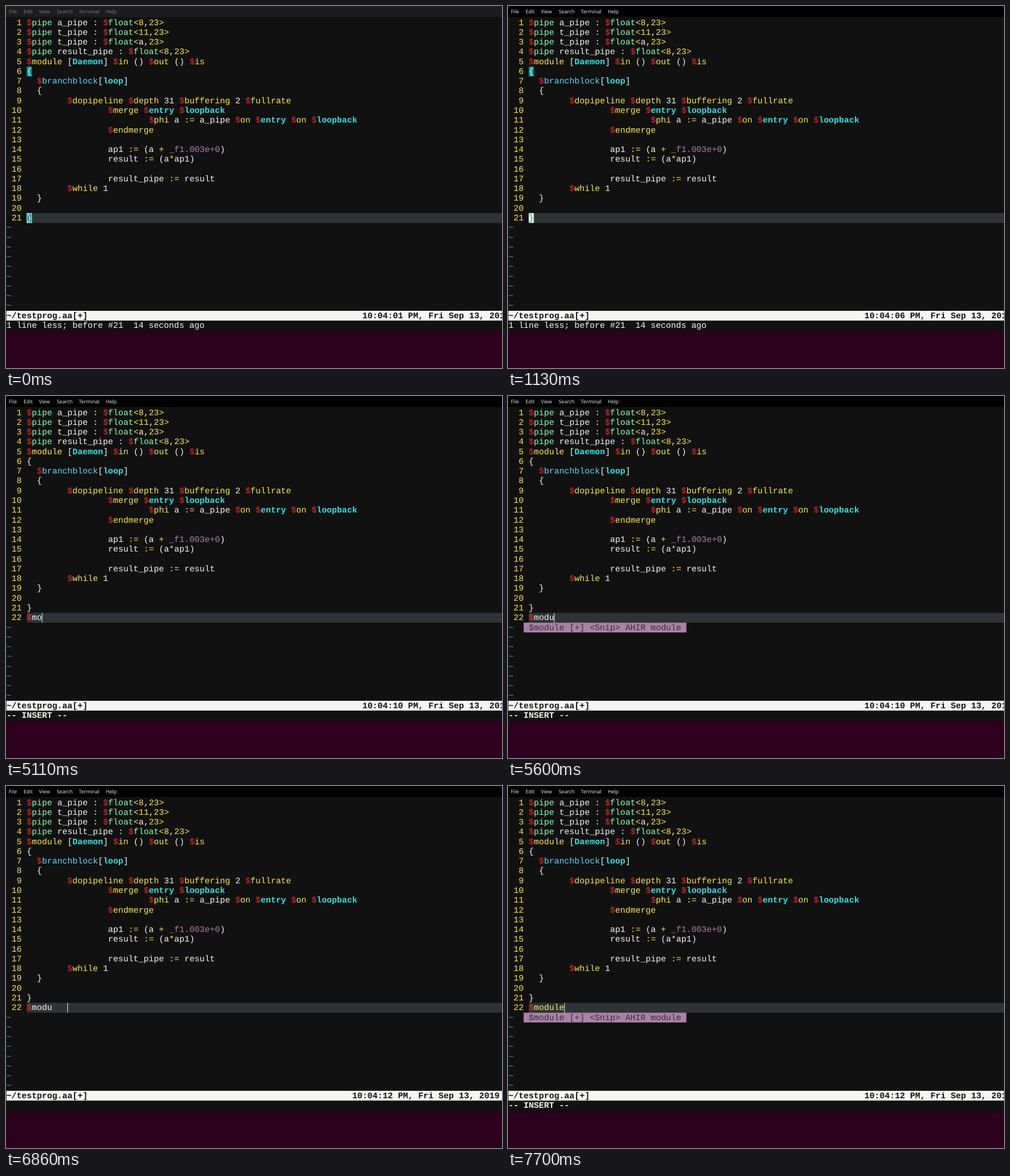
Animation of 875 by 640 pixels, one loop 8 s. Source, as an HTML page with a canvas:

```html
<!DOCTYPE html>
<html lang="en">
<head>
<meta charset="utf-8">
<title>Editor session</title>
<style>
  html, body { margin: 0; width: 100%; height: 100%; overflow: hidden; background: #2c001e; }
  canvas { display: block; }
</style>
</head>
<body>
<canvas id="stage" width="875" height="640"></canvas>
<script>
const ctx = document.getElementById('stage').getContext('2d');
ctx.textRendering = 'geometricPrecision';
const LOOP = 8000, CELL_W = 8.971, CELL_H = 17.27, LEFT = 0.7, TOP = 20.8, BASELINE = 12.8;
const WHITE = '#f5f5f3', YELLOW = '#fce94f', RED = '#ef2929', CYAN = '#34e2e2', GREEN = '#87ffaf',
  BLUE = '#5fd7ff', PURPLE = '#ad7fa8', TEAL = '#06989a', TILDE = '#4aa3c7', BACK = '#111111', BAND = '#2e3436';

const source = `$pipe a_pipe : $float<8,23>
$pipe t_pipe : $float<11,23>
$pipe t_pipe : $float<a,23>
$pipe result_pipe : $float<8,23>
$module [Daemon] $in () $out () $is
{
  $branchblock[loop]
  {
        $dopipeline $depth 31 $buffering 2 $fullrate
                $merge $entry $loopback
                        $phi a := a_pipe $on $entry $on $loopback
                $endmerge

                ap1 := (a + _f1.003e+0)
                result := (a*ap1)

                result_pipe := result
        $while 1
  }

}`.split('\n');

const keywords = {};
const setColor = (words, color) => words.split(' ').forEach(w => keywords[w] = color);
setColor('pipe float', GREEN);
setColor('entry loopback', CYAN);
setColor('branchblock', BLUE);
setColor('module in out is dopipeline depth buffering fullrate merge phi on endmerge while', YELLOW);

// Each step overrides part of the state from its time on.
const steps = [
  [0, { sec: 1, focus: false, insert: false, line: '', popup: false, redraw: false, wide: false }],
  [400, { focus: true }],
  [480, { sec: 5 }],
  [1130, { sec: 6 }],
  [3330, { sec: 8, insert: true }],
  [3910, { sec: 9 }],
  [4700, { line: '$' }],
  [4900, { sec: 10 }],
  [5000, { line: '$m' }],
  [5110, { line: '$mo' }],
  [5160, { popup: true }],
  [5380, { line: '$mod' }],
  [5430, { wide: true }],
  [5550, { wide: false }],
  [5600, { line: '$modu' }],
  [6200, { sec: 11, popup: false, wide: true, redraw: true }],
  [6250, { line: '$modu   ', wide: false, redraw: false }],
  [6860, { sec: 12, wide: true, redraw: true }],
  [6910, { line: '$modu', redraw: false }],
  [6960, { wide: false }],
  [7370, { popup: true }],
  [7620, { line: '$modul', popup: false }],
  [7700, { line: '$module', popup: true }]
];

const colX = col => LEFT + col * CELL_W;
const rowY = row => TOP + row * CELL_H;

function fill(color, x, y, w, h) {
  ctx.fillStyle = color;
  ctx.fillRect(x, y, w, h);
}

const fillCells = (color, col, row, count) =>
  fill(color, colX(col), rowY(row), count * CELL_W, CELL_H);

function print(text, col, row, color = WHITE, bold = false) {
  ctx.font = `${bold ? 'bold ' : ''}14.95px "Liberation Mono", monospace`;
  ctx.fillStyle = color;
  ctx.fillText(text, colX(col), rowY(row) + BASELINE);
}

function printCode(line, row) {
  const token = /\$\w*|(?<=\[)\w+|_f[\d.e+]+|:=|[+*<>]|(?<=[<,])\d+/g;
  let end = 0;
  for (const { 0: text, index } of line.matchAll(token)) {
    print(line.slice(end, index), 4 + end, row);
    end = index + text.length;
    if (text[0] === '$') {
      const word = text.slice(1), color = keywords[word] || WHITE;
      print('$', 4 + index, row, RED);
      print(word, 5 + index, row, color, color === CYAN);
    } else {
      const name = line[index - 1] === '[';
      print(text, 4 + index, row, name ? CYAN : text.startsWith('_f') ? PURPLE : YELLOW, name);
    }
  }
  print(line.slice(end), 4 + end, row);
}

function drawMenu(focus) {
  fill(focus ? '#000000' : '#1d1d1d', 0, 0, 875, 19.5);
  ctx.font = '8.9px "Noto Sans", sans-serif';
  ctx.fillStyle = focus ? '#e4e4e4' : '#777777';
  const items = { File: 5, Edit: 31, View: 58, Search: 89.5, Terminal: 128.5, Help: 176 };
  for (const [label, x] of Object.entries(items)) ctx.fillText(label, x, 13);
}

function drawBraces(focus) {
  fillCells(TEAL, 4, 5, 1);
  print('{', 4, 5);
  fillCells(focus ? WHITE : TEAL, 4, 20, 1);
  print('}', 4, 20, focus ? TEAL : WHITE);
  if (!focus) {
    ctx.strokeStyle = WHITE;
    ctx.lineWidth = 1;
    ctx.strokeRect(colX(4) + 0.5, rowY(20) + 0.5, CELL_W - 1, CELL_H - 1);
  }
}

function draw(time) {
  const s = {};
  for (const [start, change] of steps) if (time >= start) Object.assign(s, change);
  const lines = s.insert ? [...source, s.line] : source;
  const last = lines.length - 1;

  fill('#2c001e', 0, 0, 875, 640);
  fill(BACK, 0, 0, 875, 574.5);
  drawMenu(s.focus);
  fillCells(BAND, 4, last, 94);
  lines.forEach((line, row) => {
    print(String(row + 1).padStart(3), 0, row, YELLOW);
    printCode(line, row);
  });
  for (let row = last + 1; row < 30; row++) print('~', 0, row, TILDE);

  if (s.insert) fill(WHITE, colX(4 + s.line.length) - 0.2, rowY(last), 1, CELL_H);
  else drawBraces(s.focus);

  if (s.popup) {
    fillCells(PURPLE, 3, 22, 32);
    print('$module [+] <Snip> AHIR module', 4, 22, BAND);
  }

  fillCells(WHITE, 0, 30, 98);
  print('~/testprog.aa[+]', 0, 30, BACK, true);
  const clock = `10:04:${String(s.sec).padStart(2, '0')} PM, Fri Sep 13, 2019`;
  print(clock, s.wide ? 68 : 70, 30, BACK, true);

  if (!s.insert) print('1 line less; before #21  14 seconds ago', 0, 31);
  else if (!s.redraw) print('-- INSERT --', 0, 31, WHITE, true);
}

function tick() {
  draw(performance.now() % LOOP);
  requestAnimationFrame(tick);
}
tick();
</script>
</body>
</html>
```
